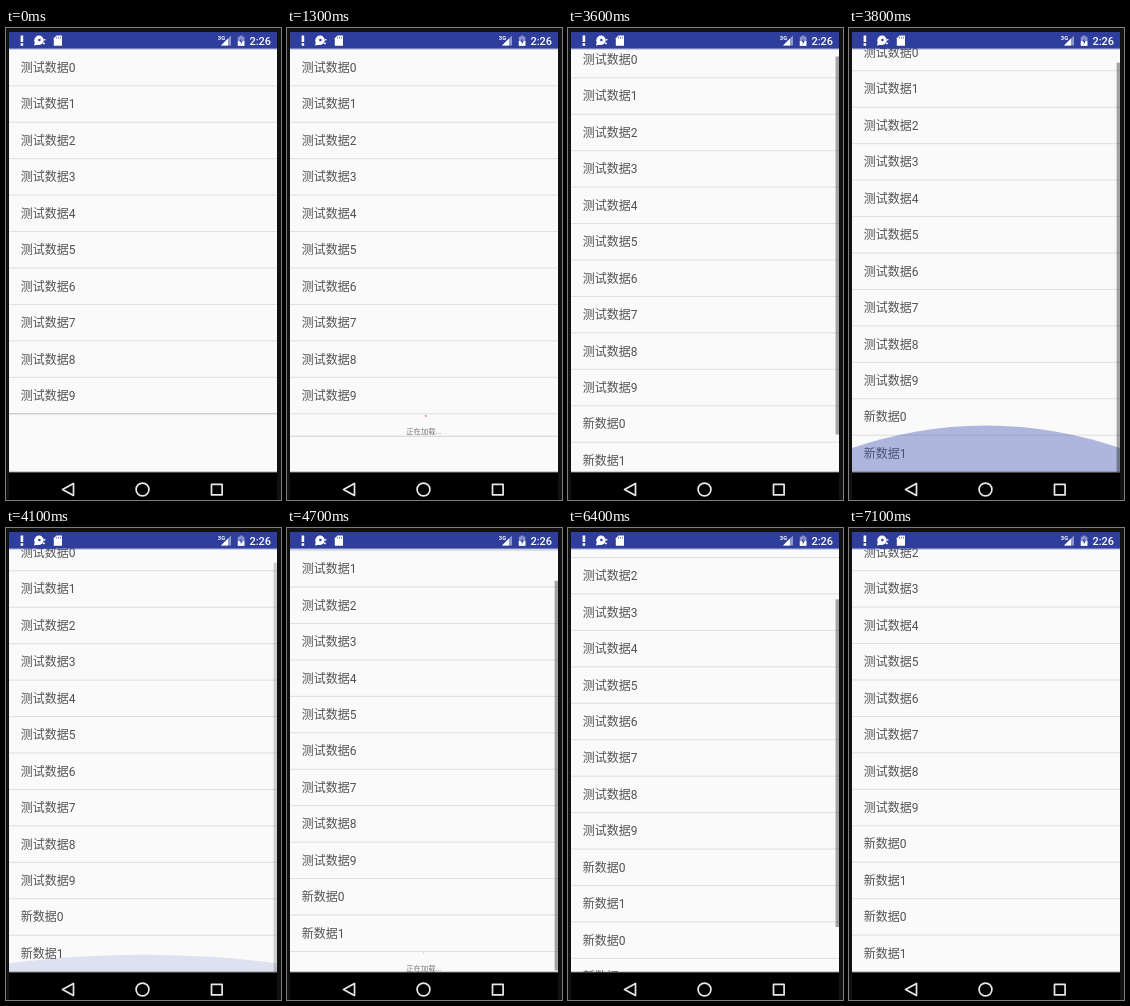
Write an HTML page with a canvas that moves like this. It is 275 by 472 pixels and loops after 7.7 s.

```html
<!DOCTYPE html>
<html lang="zh">
<head>
<meta charset="utf-8">
<title>List that loads more rows</title>
<style>
html, body { margin: 0; width: 100%; height: 100%; overflow: hidden; background: #111; }
canvas { display: block; width: 275px; height: 472px; }
</style>
</head>
<body>
<canvas id="stage"></canvas>
<script>
const W = 275, H = 472, LOOP = 7700, STEP = 100;
const LEFT = 3, RIGHT = 271, WIDTH = RIGHT - LEFT;
const TOP = 21.3, BOTTOM = 444.5, ROW = 36.44, FOOT = 22.5;
const FONT = 'Roboto, "Noto Sans CJK SC", "Noto Sans CJK", sans-serif';

// [time, scroll offset]
const SCROLL = [[0, 0], [3600, 8], [3700, 15], [4700, 35.2], [4800, 37.3], [6400, 64.7], [6500, 88]];
// [time, height scale, alpha]
const GLOW = [
  [3600, 0, 0], [3800, .875, .4], [3900, .78, .34], [4100, .33, .15], [4300, 0, 0],
  [4700, 0, 0], [5000, .92, .3], [5200, .83, .24], [5300, .68, .16], [5500, .2, .04], [5700, 0, 0]
];

const canvas = document.getElementById('stage');
const dpr = window.devicePixelRatio || 1;
canvas.width = W * dpr;
canvas.height = H * dpr;
const c = canvas.getContext('2d');

const clamp = v => Math.max(0, Math.min(1, v));
const ease = v => { v = clamp(v); return v * v * (3 - 2 * v); };

function rect(x, y, w, h, color) {
  c.fillStyle = color;
  c.fillRect(x, y, w, h);
}

function text(str, x, y, size, color, align = 'left', weight = 400) {
  c.font = `${weight} ${size}px ${FONT}`;
  c.textAlign = align;
  c.fillStyle = color;
  c.fillText(str, x, y);
}

function poly(points, color, stroke) {
  c.beginPath();
  points.forEach(([x, y]) => c.lineTo(x, y));
  c.closePath();
  c[stroke ? 'strokeStyle' : 'fillStyle'] = color;
  stroke ? c.stroke() : c.fill();
}

function disc(x, y, r, color) {
  c.beginPath();
  c.arc(x, y, r, 0, 7);
  c.fillStyle = color;
  c.fill();
}

function glowAt(t) {
  const i = GLOW.findIndex(k => k[0] > t);
  if (i < 1) return [0, 0];
  const a = GLOW[i - 1], b = GLOW[i];
  const p = (t - a[0]) / (b[0] - a[0]);
  return [a[1] + (b[1] - a[1]) * p, a[2] + (b[2] - a[2]) * p];
}

function label(i) {
  return i < 10 ? '测试数据' + i : '新数据' + i % 2;
}

function divider(y, color = '#e1e1e1') {
  rect(LEFT, y - .5, WIDTH, 1.1, color);
}

function spinner(x, y, ms) {
  const cycles = ms / 1333, u = cycles % 1;
  const base = .25 * u + .4 * cycles - .25;
  const from = base + .75 * ease(2 * u - 1);
  const to = base + .75 * ease(2 * u) + .02;
  c.beginPath();
  c.arc(x, y, 4.8, from * 2 * Math.PI, to * 2 * Math.PI);
  c.strokeStyle = '#e8508f';
  c.lineWidth = 1.2;
  c.stroke();
}

function glow(t) {
  const [scale, alpha] = glowAt(t);
  if (!alpha) return;
  const r = WIDTH * 1.35, height = WIDTH * .2;
  c.save();
  c.translate(LEFT + WIDTH / 2, BOTTOM);
  c.scale(1, scale);
  disc(0, r - height, r, `rgba(63,81,181,${alpha})`);
  c.restore();
}

// Measured in rows; the footer counts as one more row.
function scrollbar(count, scroll, foot, footHeight, alpha) {
  const unit = (BOTTOM - TOP) / (count + 1);
  const shownFoot = footHeight ? clamp((BOTTOM - foot) / footHeight) : 1;
  const last = foot > BOTTOM ? (BOTTOM - TOP + scroll) / ROW : count + shownFoot;
  const top = TOP + scroll / ROW * unit;
  rect(267.6, top, 3.4, TOP + last * unit - top, `rgba(0,0,0,${.35 * alpha})`);
}

function list(t) {
  const count = t < 2800 ? 10 : t < 5500 ? 12 : 14;
  const start = t >= 1200 && t < 2800 ? 1200 : t >= 4700 && t < 5500 ? 4700 : -1;
  const loading = start >= 0;
  const [moved, scroll] = SCROLL.filter(k => k[0] <= t).pop();
  const foot = TOP + count * ROW - scroll;

  c.save();
  c.beginPath();
  c.rect(LEFT, 20, WIDTH, BOTTOM - 20);
  c.clip();
  rect(LEFT, 20, WIDTH, BOTTOM - 20, '#fafafa');
  rect(LEFT, 443.2, WIDTH, 2, '#c9c9c9');

  for (let i = 0; i < count; i++) {
    const y = TOP + i * ROW - scroll;
    text(label(i), 14.7, y + 22.7, 12, '#525252');
    divider(y + ROW);
  }
  if (loading) {
    spinner(136.5, foot + 6.4, t - start);
    text('正在加载...', 136.8, foot + 20, 7.3, '#777', 'center');
    divider(foot + FOOT, '#d4d4d4');
  } else {
    divider(foot, '#cacaca');
  }
  glow(t);

  const fade = moved ? 1 - clamp((t - moved - 250) / 300) : 0;
  if (fade) scrollbar(count, scroll, foot, loading ? FOOT : 0, fade);
  c.restore();
}

function statusBar() {
  const bar = '#2f3d9c', white = '#fff', dim = '#8d96cb';
  rect(LEFT, 4, WIDTH, 16.6, bar);
  rect(LEFT, 20.6, WIDTH, 1, 'rgba(47,61,156,.35)');

  rect(14.6, 7.5, 2.6, 6.5, white);
  rect(14.6, 15.2, 2.6, 2.6, white);

  disc(33, 12.3, 4.7, white);
  poly([[28, 17.6], [29, 13], [33, 16.4]], white);
  disc(33.4, 12, 1.3, bar);
  rect(37.8, 11, 1.6, 1.4, white);
  rect(37, 14.6, 1.8, 1.6, white);

  poly([[50.5, 7.5], [56, 7.5], [56, 17.8], [47.8, 17.8], [47.8, 10.2]], white);
  [50.3, 52.2, 54.1].forEach(x => rect(x, 8.8, .6, 1.8, bar));

  poly([[215, 17.5], [225, 17.5], [225, 7.5]], dim);
  poly([[215, 17.5], [222, 17.5], [222, 10.5]], white);
  text('3G', 211.8, 11.8, 5.8, white, 'left', 700);

  rect(233.6, 7.6, 3, 1.5, dim);
  rect(231.8, 8.8, 6.6, 9, dim);
  rect(231.8, 13, 6.6, 4.8, white);
  poly([[235.6, 9.8], [233.4, 13.8], [235, 13.8], [234.6, 16.8], [236.8, 12.8], [235.2, 12.8]], bar);

  text('2:26', 243.4, 16.6, 11, white, 'left', 500);
}

function navBar() {
  const white = '#e8e8e8';
  rect(LEFT, BOTTOM, WIDTH, H - BOTTOM, '#000');
  c.lineWidth = 1.7;
  c.lineJoin = 'round';
  poly([[56.5, 461.5], [67.5, 455.5], [67.5, 467.5]], white, true);
  c.beginPath();
  c.arc(136.5, 461.5, 6.4, 0, 7);
  c.stroke();
  c.strokeRect(205.5, 456.3, 10.6, 10.6);
}

function draw(now) {
  const t = Math.floor((now % LOOP + 1) / STEP) * STEP % LOOP;
  c.setTransform(dpr, 0, 0, dpr, 0, 0);
  rect(0, 0, W, H, '#111');
  list(t);
  statusBar();
  navBar();
}

const began = performance.now();
function tick() {
  draw(performance.now() - began);
  requestAnimationFrame(tick);
}
tick();
</script>
</body>
</html>
```
